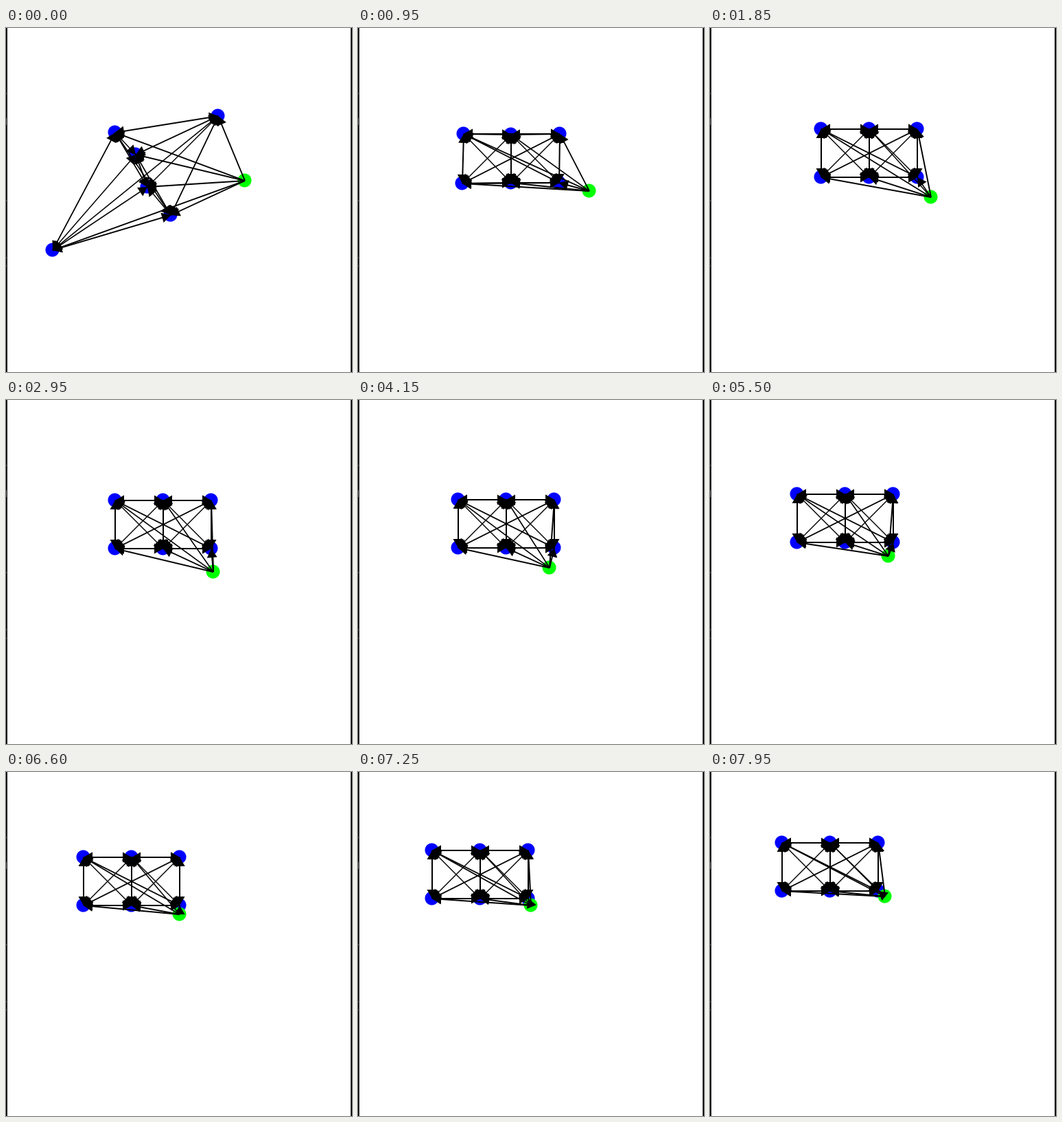
Recreate the animation shown at these times as a matplotlib script. Size 504 by 500 pixels, loop 8000 ms.

```python
from itertools import combinations, permutations

import matplotlib.pyplot as plt
import numpy as np
from matplotlib.animation import FuncAnimation
from matplotlib.collections import PolyCollection
from matplotlib.patches import Circle, Rectangle

W, H, DPI = 504, 500, 100
FRAMES, INTERVAL = 160, 50

# Leader: uniform motion on a circle
CENTER = np.array([302.6, 198.3])
ORBIT = 51.0
PHASE, OMEGA = np.radians(27.6), np.radians(21.7)

# Followers: consensus towards a 3 x 2 formation
START = np.array([(158, 151), (188, 183), (308, 127),
                  (67, 322), (205, 230), (239, 271)]) + 0.5
SLOTS = np.array([(x, y) for y in (-35, 35) for x in (-70, 0, 70)], float)
ANCHOR = np.array([217.4, 129.7])
GAIN = np.array([0.63, 0.68])
SPREAD_RATE = 7 * 0.66

RADIUS = 10
HEAD_BASE, HEAD_HALF = 13, 7.5
LINE_PX = 2


def leader(t):
    a = PHASE + OMEGA * t
    return CENTER + ORBIT * np.array([np.cos(a), np.sin(a)])


def steady(t):
    """Delayed response of the group centre to the leader's circle."""
    lag = np.arctan(OMEGA / GAIN)
    a = PHASE + OMEGA * t - lag
    return ANCHOR + ORBIT * np.cos(lag) * np.array([np.cos(a[0]), np.sin(a[1])])


def followers(t):
    mid = START.mean(axis=0)
    centre = steady(t) + (mid - steady(0)) * np.exp(-GAIN * t)
    return centre + SLOTS + (START - mid - SLOTS) * np.exp(-SPREAD_RATE * t)


# Every follower links to every other one; the leader (index 6) only sends
PAIRS = np.array(list(combinations(range(7), 2)))
SRC, DST = np.array(list(permutations(range(6), 2)) + [(6, i) for i in range(6)]).T

fig = plt.figure(figsize=(W / DPI, H / DPI), dpi=DPI, facecolor="white")
ax = fig.add_axes([0, 0, 1, 1])
ax.set_xlim(0, W)
ax.set_ylim(H, 0)
ax.axis("off")


def strip(x, y, w, h, color):
    ax.add_patch(Rectangle((x, y), w, h, color=color, lw=0))


strip(0, 0, 2, H, "#161616")
strip(502, 0, 2, H, "#161616")
strip(0, 131, 1, 10, "#707070")
for y in (94, 250, 333, 345):
    strip(0, y, 1, 2, "#606060")

dots = [Circle((0, 0), RADIUS, color=c, lw=0, zorder=2)
        for c in ["#0000ff"] * 6 + ["#00ff00"]]
for dot in dots:
    ax.add_patch(dot)


def black_shapes():
    shapes = PolyCollection([], facecolors="black", edgecolors="none",
                            linewidths=0, zorder=3)
    shapes.set_snap(False)
    ax.add_collection(shapes, autolim=False)
    return shapes


lines, heads = black_shapes(), black_shapes()


def strokes(a, b):
    """Bands of fixed thickness along the minor axis of each segment."""
    d = np.abs(b - a)
    flat = d[:, 0] >= d[:, 1]
    off = np.column_stack([~flat, flat]) * LINE_PX / 2
    return np.stack([a - off, b - off, b + off, a + off], axis=1)


def triangles(a, b):
    """Arrowheads with the tip on b, pointing away from a."""
    d = a - b
    u = d / np.linalg.norm(d, axis=1, keepdims=True)
    n = np.column_stack([-u[:, 1], u[:, 0]])
    base = b + HEAD_BASE * u
    return np.stack([b, base + HEAD_HALF * n, base - HEAD_HALF * n], axis=1)


def draw(i):
    t = i * INTERVAL / 1000
    nodes = np.floor(np.vstack([followers(t), leader(t)]))
    for dot, p in zip(dots, nodes):
        dot.center = tuple(p + 0.5)
    ends = nodes + 1
    lines.set_verts(strokes(ends[PAIRS[:, 0]], ends[PAIRS[:, 1]]))
    heads.set_verts(triangles(ends[SRC], ends[DST]))
    return [*dots, lines, heads]


anim = FuncAnimation(fig, draw, frames=FRAMES, interval=INTERVAL,
                     repeat=True, repeat_delay=0)
plt.show()
```
